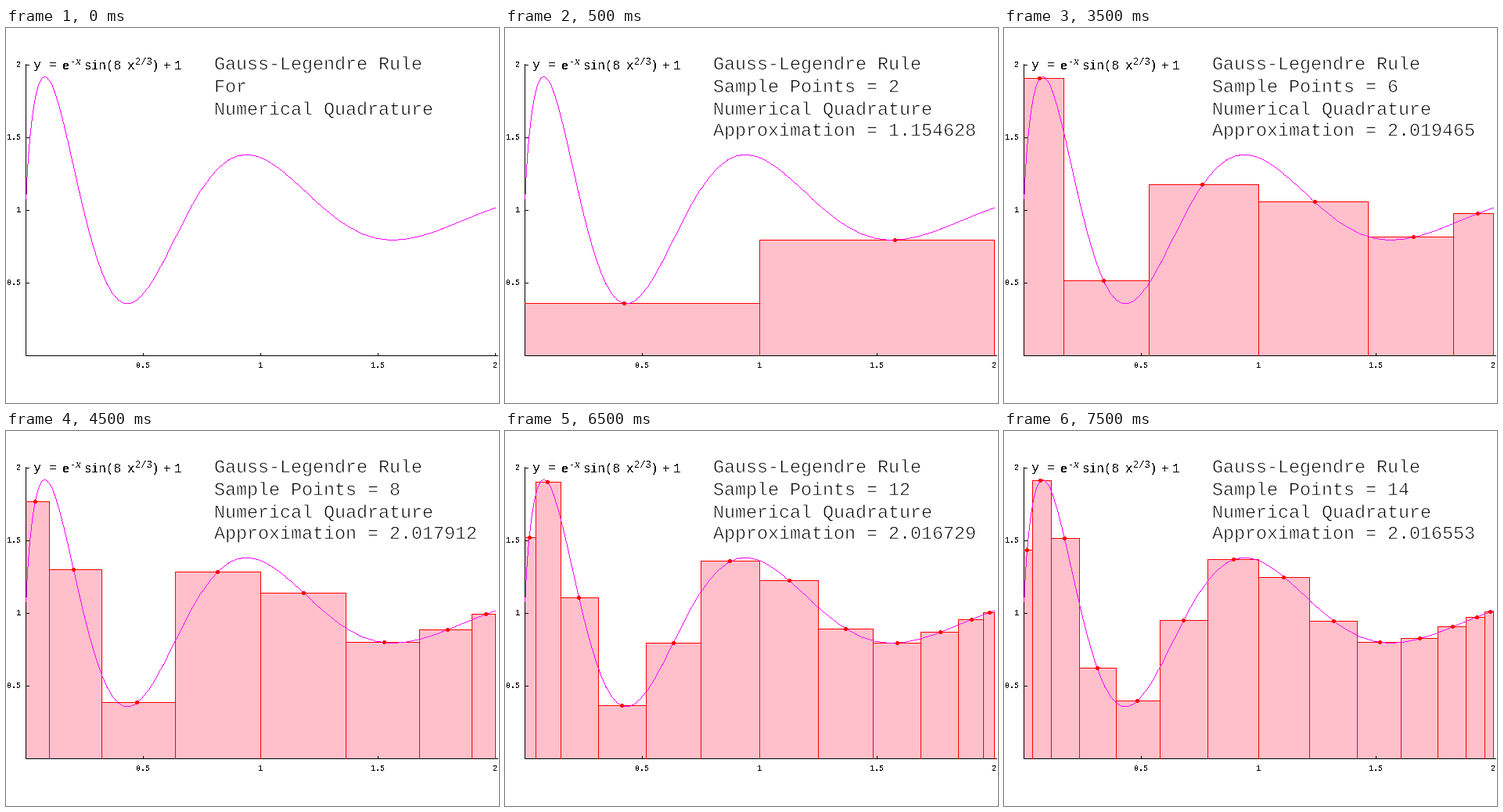
Animation of 630x480 px, one loop 8 s. Source, as a matplotlib script:

```python
import matplotlib.pyplot as plt
import numpy as np
from matplotlib.animation import ArtistAnimation
from matplotlib.patheffects import Stroke

WIDTH, HEIGHT, DPI = 630, 480, 72  # one point equals one pixel
LEFT, BASE, X_UNIT, Y_UNIT = 25, 419, 300, 186
PINK, RED, MAGENTA = "pink", "#ff0000", (255, 0, 255, 255)

plt.rcParams["text.antialiased"] = False


def f(x):
    return np.exp(-x) * np.sin(8 * x ** (2 / 3)) + 1


def px(x):
    return np.rint(LEFT + X_UNIT * np.asarray(x)).astype(int)


def py(y):
    return np.rint(BASE - Y_UNIT * np.asarray(y)).astype(int)


fig = plt.figure(figsize=(WIDTH / DPI, HEIGHT / DPI), dpi=DPI, facecolor="white")
ax = fig.add_axes([0, 0, 1, 1])
ax.set(xlim=(0, WIDTH), ylim=(HEIGHT, 0))
ax.axis("off")


def line(xs, ys, color="black", z=3):
    """Straight line whose whole coordinates name pixels."""
    return ax.plot(xs, ys, color=color, lw=1, antialiased=False, snap=True,
                   solid_capstyle="projecting", zorder=z)[0]


def text(x, y, s, size, **kw):
    return ax.text(x, y, s, fontsize=size, family="Liberation Mono",
                   va="baseline", color="black", zorder=6, **kw)


def title_line(y, s):
    # A white outline trims the letters to a light weight.
    return text(266, y, s, 23.33, antialiased=True,
                path_effects=[Stroke(linewidth=0.7, foreground="white")])


def draw_axes():
    line([LEFT, WIDTH - 2], [BASE, BASE])
    line([LEFT, LEFT], [46, BASE])
    for value in (0.5, 1, 1.5, 2):
        x, y = px(value), py(value)
        line([x, x], [BASE - 3, BASE])
        line([LEFT, LEFT + 4], [y, y])
        text(x, 435, f"{value:g}", 10, ha="center")
        text(19, y + 3, f"{value:g}", 10, ha="right")


def draw_formula():
    text(35, 52, "y =", 16.7)
    text(72, 53, "e", 15, weight="bold")
    text(82, 47, "-", 11.5)
    text(89, 47, "x", 11.5, style="italic")
    text(100, 53, "sin(8", 16)
    text(155, 53, "x", 16)
    text(165, 47, "2/3", 12)
    text(186, 53, ")", 16)
    text(201, 53, "+", 16)
    text(215, 53, "1", 16)


def draw_curve():
    """Plot the function one pixel thick, stepping along the longer axis."""
    xs = np.linspace(0.1, 2 ** (1 / 3), 80) ** 3
    us, vs = LEFT + X_UNIT * xs, BASE - Y_UNIT * f(xs)
    layer = np.zeros((HEIGHT, WIDTH, 4), np.uint8)
    for u0, u1, v0, v1 in zip(us, us[1:], vs, vs[1:]):
        count = int(max(abs(u1 - u0), abs(v1 - v0))) + 2
        cols = np.rint(np.linspace(u0, u1, count)).astype(int)
        rows = np.rint(np.linspace(v0, v1, count)).astype(int)
        layer[rows, cols] = MAGENTA
    ax.imshow(layer, extent=(0, WIDTH, HEIGHT, 0), aspect="auto",
              interpolation="nearest", zorder=5)


def quadrature(n):
    """Artists for the n-point rule: bars as wide as the weights."""
    nodes, weights = np.polynomial.legendre.leggauss(n)
    nodes = nodes + 1
    heights = f(nodes)
    edges = px(np.concatenate([[0], np.cumsum(weights)]))
    tops = py(heights)
    artists = []
    for x0, x1, top in zip(edges, edges[1:], tops):
        artists.append(ax.add_patch(plt.Rectangle(
            (x0, top), x1 - x0, BASE - top,
            facecolor=PINK, lw=0, antialiased=False, zorder=1)))
        artists.append(line([x0, x1], [top, top], RED, 4))
        artists.append(line([x1, x1], [top, BASE], RED, 4))
    for x, top in zip(edges[1:], tops[1:]):
        artists.append(line([x, x], [top, BASE], RED, 4))
    for x, y in zip(px(nodes), tops):
        artists.append(ax.add_patch(plt.Circle(
            (x + 0.5, y + 0.5), 2.05,
            facecolor=RED, lw=0, antialiased=False, zorder=6)))
    total = np.dot(weights, heights)
    artists.append(title_line(82, f"Sample Points = {n}"))
    artists.append(title_line(138, f"Approximation = {total:.6f}"))
    return artists


draw_axes()
draw_formula()
draw_curve()
title_line(53, "Gauss-Legendre Rule")
title_line(111, "Numerical Quadrature")

# Each step lasts a number of half seconds.
steps = [([title_line(82, "For")], 1), (quadrature(2), 4)]
steps += [(quadrature(n), 2) for n in (4, 6, 8, 10, 12)]
steps.append((quadrature(14), 1))
frames = [artists for artists, count in steps for _ in range(count)]

anim = ArtistAnimation(fig, frames, interval=500, repeat=True, repeat_delay=0)
plt.show()
```
